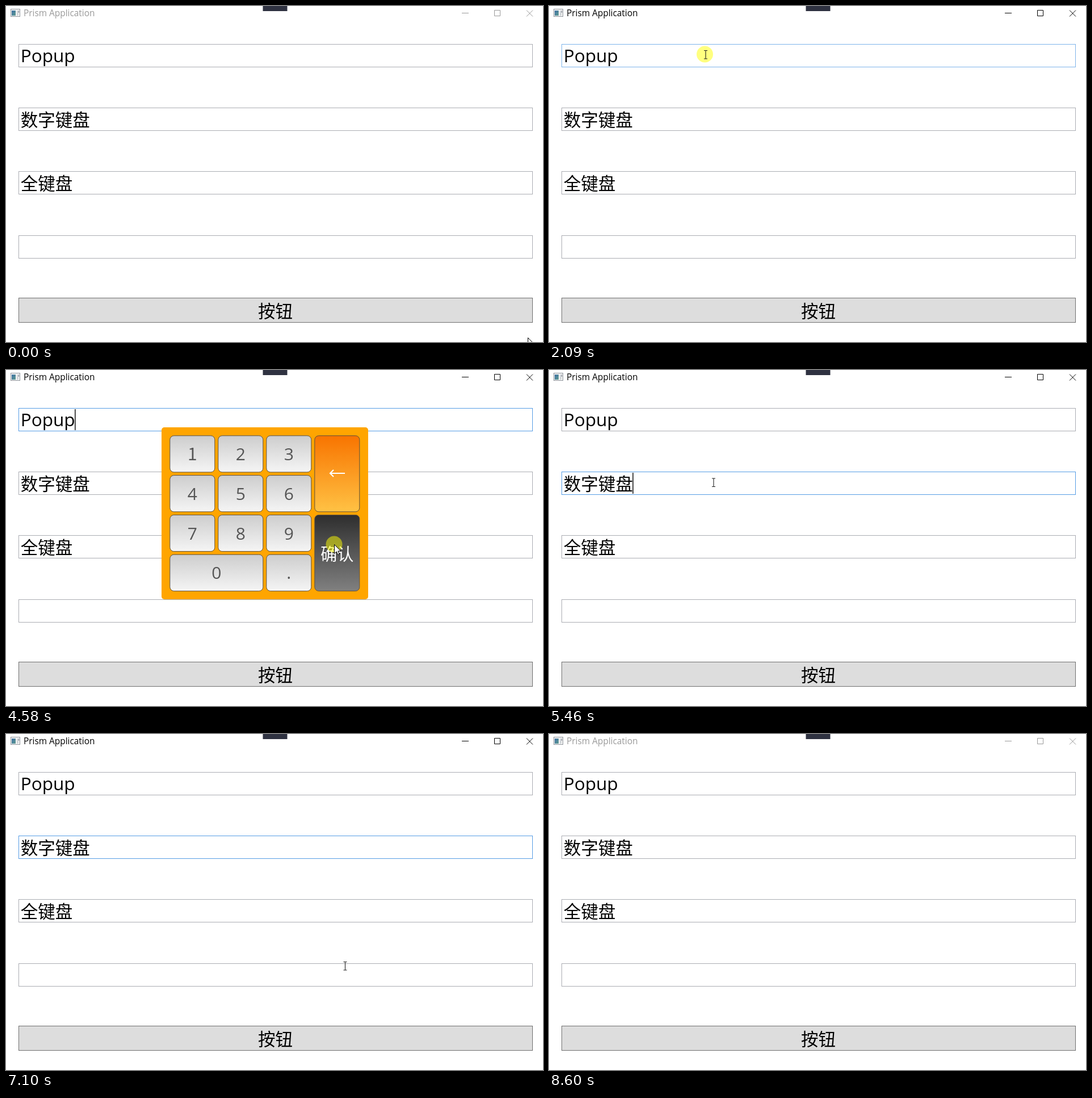
An HTML page for the animation above (8.67 s loop, 946 by 592 pixels).

```html
<!DOCTYPE html>
<html lang="zh">
<head>
<meta charset="utf-8">
<title>Keypad popup</title>
<style>
  html, body { margin: 0; width: 100%; height: 100%; overflow: hidden; background: #fff; }
  svg { display: block; width: 946px; height: 592px; cursor: default; }
  .latin { font-family: "Open Sans", "Noto Sans", sans-serif; }
  .cjk { font-family: "Noto Sans CJK SC", "Noto Sans CJK", sans-serif; }
  .mid { text-anchor: middle; }
</style>
</head>
<body>
<svg id="stage" viewBox="0 0 946 592" xmlns="http://www.w3.org/2000/svg">
  <defs>
    <linearGradient id="grey" x2="0" y2="1"><stop stop-color="#cdcdcd"/><stop offset="1" stop-color="#f5f5f5"/></linearGradient>
    <linearGradient id="orange" x2="0" y2="1"><stop stop-color="#f87400"/><stop offset="1" stop-color="#ffc244"/></linearGradient>
    <linearGradient id="dark" x2="0" y2="1"><stop stop-color="#2e2e2e"/><stop offset="1" stop-color="#808080"/></linearGradient>
    <linearGradient id="pane" x2="1" y2="1"><stop stop-color="#3d6fa5"/><stop offset="1" stop-color="#5f9c90"/></linearGradient>
  </defs>
</svg>
<script>
const LOOP = 8670, STEP = 70, BLINK = 510;
const ACTIVATE = 2090, BLUR = 8600;
const stage = document.getElementById("stage");

function add(parent, tag, attrs, text) {
  const node = document.createElementNS("http://www.w3.org/2000/svg", tag);
  for (const key in attrs) node.setAttribute(key, attrs[key]);
  if (text) node.textContent = text;
  parent.append(node);
  return node;
}
function box(parent, x, y, width, height, fill, stroke = "none", rx = 0) {
  return add(parent, "rect", { x, y, width, height, rx, fill, stroke });
}
function label(parent, x, y, size, fill, text, cls) {
  return add(parent, "text", { x, y, "font-size": size, fill, class: cls }, text);
}
function show(node, on) {
  node.style.display = on ? "" : "none";
}
function paint(node, fill, stroke) {
  node.setAttribute("fill", fill);
  node.setAttribute("stroke", stroke);
}

// Title bar
box(stage, 8.5, 5.5, 16, 13, "#f4f4f4", "#8f959c");
box(stage, 10, 8, 7, 9, "url(#pane)");
box(stage, 19, 8, 3, 9, "#d3d6da");
box(stage, 22, 8, 1, 4, "#7f868e");
box(stage, 452.5, 0, 43, 9, "#2f3241");
const title = label(stage, 31, 18.4, 15.4, "#999", "Prism Application", "latin");
const controls = add(stage, "path", { d: "M803 12.5h12M860.5 7.5h10v10h-10zM917 7.5l11 11M928 7.5l-11 11" });

// Form
const FIELD_W = 905, FIELD_H = 40;
const fields = ["Popup", "数字键盘", "全键盘", ""].map((text, i) => {
  const y = 67.5 + Math.round(i * 112.2);
  const rect = box(stage, 22.5, y, FIELD_W, FIELD_H, "#fff", "#abadb3");
  const latin = text === "Popup";
  const words = label(stage, 25.7, y + (latin ? 31.5 : 32.5), latin ? 31.5 : 30.5, "#000", text, latin ? "latin" : "cjk");
  const caretX = 25.2 + words.getComputedTextLength();
  return { y, rect, caret: box(stage, caretX, y + 1.5, 1.4, 37, "#000") };
});
const button = box(stage, 22.5, 514.5, FIELD_W, 43, "#ddd", "#707070");
label(stage, 474.5, 548.5, 30.5, "#000", "按钮", "cjk mid");

// Keypad, drawn from its own top left corner
const PAD_W = 364, PAD_H = 303;
const pad = add(stage, "g", {});
box(pad, 0, 0, PAD_W, PAD_H, "#ffa500", "none", 5);
function key(col, row, cols, rows, fill) {
  return box(pad, 14.8 + col * 85, 14.8 + row * 69.8, cols * 85 - 6, rows * 69.8 - 5.6, fill, "#5c5040", 7);
}
function digit(text, col, row, cols = 1) {
  key(col, row, cols, 1, "url(#grey)");
  label(pad, 54.3 + col * 85 + (cols - 1) * 42.5, 58 + row * 69.8, 30, "#555", text,
    text === "1" ? "cjk mid" : "latin mid");
}
for (let n = 1; n <= 9; n++) digit(String(n), (n - 1) % 3, Math.floor((n - 1) / 3));
digit("0", 0, 3, 2);
digit(".", 2, 3);
key(3, 0, 1, 2, "url(#orange)");
add(pad, "path", { d: "M297 81h26M303 75l-6 6 6 6", fill: "none", stroke: "#fff", "stroke-width": 2.2 });
const confirmKey = key(3, 2, 1, 2, "url(#orange)");
label(pad, 309.3, 233.5, 29.2, "#fff", "确认", "cjk mid");

// Pointer, drawn from its hot spot
const pointer = add(stage, "g", {});
const halo = add(pointer, "circle", { r: 14.5, fill: "#ff0", "fill-opacity": 0.5 });
const arrow = add(pointer, "path", {
  d: "M.5 .5v16l3.7-3.5 2.5 5.6 2.5-1.1-2.4-5.4h5z", fill: "#fff", stroke: "#000"
});
const beam = add(pointer, "path", {
  d: "M-1.5-6.5h2.5l.5 .5 .5-.5h2.5M-1.5 8h2.5l.5-.5 .5 .5h2.5M1.5-6v13.5", fill: "none", stroke: "#222", "stroke-width": 1.1
});

// Each move starts where the one before ended; sag bends it vertically
const home = { x: 919, y: 584 };
const moves = [
  { from: 50, to: 1000, x: 274.5, y: 85, sag: -64 },
  { from: 2825, to: 3750, x: 578, y: 307, sag: 10 },
  { from: 4650, to: 5290, x: 288.5, y: 197.5, sag: 0 },
  { from: 5750, to: 6500, x: 606, y: 425, sag: 0 },
  { from: 6500, to: 6700, x: 596, y: 408, sag: 0 },
  { from: 7400, to: 8130, x: 950, y: 598, sag: 0 }
];
const gone = moves[moves.length - 1].to;

function pointerAt(t) {
  let { x, y } = home;
  for (const m of moves) {
    if (t < m.from) break;
    const k = Math.min(1, (t - m.from) / (m.to - m.from));
    const p = 1 - (1 - k) ** 2;
    x += (m.x - x) * p;
    y += (m.y - y) * p + m.sag * 4 * p * (1 - p);
  }
  return { x, y };
}

// One visit per field: click, focus, keypad opens, confirm pressed, keypad closes
const visits = [
  { click: 2090, focus: 2360, open: 2490, press: 4510, close: 4650 },
  { click: 5390, focus: 5460, open: 5530, press: 7030, close: 7100 }
];
visits.forEach((v, i) => {
  const at = pointerAt(v.open);
  v.x = at.x - 0.5;
  v.y = at.y + 16;
  v.blur = visits[i + 1] ? visits[i + 1].focus : BLUR;
});

const within = (t, from, to) => t >= from && t < to;
const inside = (p, x, y, w, h) => within(p.x, x, x + w) && within(p.y, y, y + h);

function draw(t) {
  const at = pointerAt(t);
  const opened = visits.find(v => within(t, v.open, v.close));
  const overPad = opened && inside(at, opened.x, opened.y, PAD_W, PAD_H);
  const over = (y, h) => !overPad && inside(at, 22, y, FIELD_W + 1, h);
  // Hover returns one step after the keypad closes
  const captured = visits.some(v => within(t, v.open, v.close + STEP));
  const pressed = visits.some(v => within(t, v.press, v.close));
  const clicked = visits.some(v => within(t, v.click, v.click + STEP));

  const ink = within(t, ACTIVATE, BLUR) ? "#000" : "#999";
  title.setAttribute("fill", ink);
  paint(controls, "none", ink);

  fields.forEach((f, i) => {
    const v = visits[i];
    const focused = v && within(t, v.focus, v.blur);
    const hover = over(f.y, FIELD_H) && !captured;
    paint(f.rect, "#fff", focused ? "#569de5" : hover ? "#7eb4ea" : "#abadb3");
    show(f.caret, focused && (t - v.focus) % (2 * BLINK) < BLINK);
  });
  if (over(514, 44)) paint(button, "#bee6fd", "#3c7fb1");
  else paint(button, "#ddd", "#707070");

  show(pad, opened);
  if (opened) pad.setAttribute("transform", `translate(${opened.x} ${opened.y})`);
  confirmKey.setAttribute("fill", pressed ? "url(#dark)" : "url(#orange)");

  const overField = fields.some(f => over(f.y, FIELD_H));
  show(pointer, t < gone);
  pointer.setAttribute("transform", `translate(${at.x} ${at.y})`);
  show(halo, pressed || clicked);
  show(beam, overField);
  show(arrow, !overField);
}

const start = performance.now();
function tick() {
  draw((performance.now() - start) % LOOP);
  requestAnimationFrame(tick);
}
tick();
</script>
</body>
</html>
```
